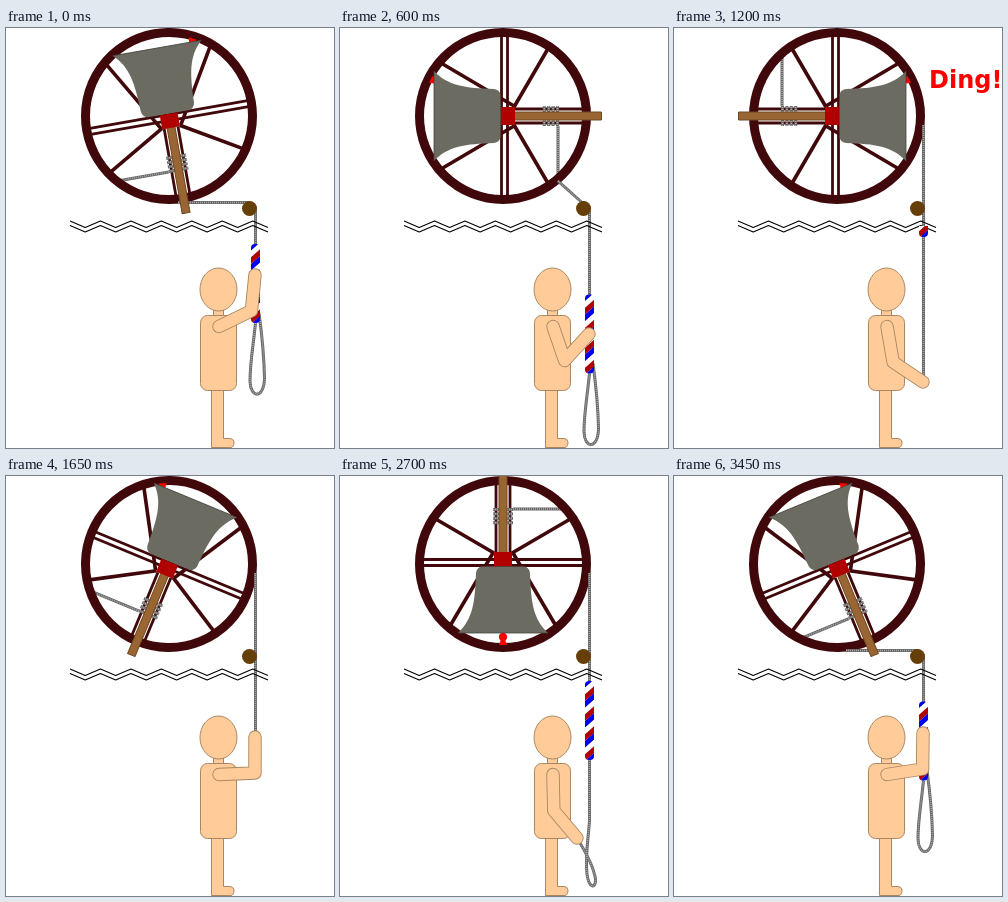
Recreate the animation shown at these times as an HTML page with a canvas. Size 328 px wide and 420 px high, loop 3.6 s.

```html
<!DOCTYPE html>
<html lang="en">
<head>
<meta charset="utf-8">
<title>Bell ringing</title>
<style>
html, body { margin: 0; overflow: hidden; background: #fff; }
canvas { display: block; }
</style>
</head>
<body>
<canvas id="stage" width="328" height="420"></canvas>
<script>
const ctx = document.getElementById('stage').getContext('2d');
const RAD = Math.PI / 180, STEP = 150, STEPS = 24;
const HUB = { x: 163, y: 88 }, SHOULDER = { x: 213, y: 298.5 };
const ROPE_X = 249.5, SALLY_LENGTH = 79;
const DARK = '#40080a', SKIN = '#ffcc99', SKIN_EDGE = '#a98762', BELL = '#6b6b62';

// One stroke of the bell; the return stroke runs it backwards.
const rotations = [170, 157.5, 135, 112.5, 90, 45, 0, -45, -90, -112.5, -135, -157.5, -170];
const sallyTops = [216, 225.5, 245, 262, 266.5, 238, 205, 169, 130, 60, 0, 0, 0];
const hands = [[249, 247], [249, 257], [249, 277], [249, 297], [249, 306], [245, 338], [237, 362],
  [243, 361], [249, 354], [249, 319], [249, 283], [249, 261], [249, 250]];
const tailBottoms = { 5: 416, 6: 411, 7: 380 };

function stroke(path, color, width) {
  ctx.strokeStyle = color;
  ctx.lineWidth = width;
  ctx.stroke(path);
}

function line(points, color, width) {
  stroke(new Path2D('M' + points.join('L')), color, width);
}

function shape(d, fill, edge) {
  const path = new Path2D(d);
  ctx.fillStyle = fill;
  ctx.fill(path);
  if (edge) stroke(path, edge, 1);
}

function rope(d) {
  const path = new Path2D(d);
  stroke(path, '#666', 3);
  ctx.setLineDash([1, 1]);
  stroke(path, '#aaa', 1.6);
  ctx.setLineDash([]);
}

function disc(x, y, r, color) {
  ctx.beginPath();
  ctx.arc(x, y, r, 0, 7);
  ctx.fillStyle = color;
  ctx.fill();
}

function inBellFrame(rotation, draw) {
  ctx.save();
  ctx.translate(HUB.x, HUB.y);
  ctx.rotate(rotation * RAD);
  draw();
  ctx.restore();
}

function drawWheel() {
  for (const y of [-4.5, 1.5]) line([[-80, y], [80, y]], DARK, 2.8);
  for (const side of [-1, 1]) {
    line([[side * 7, -80], [side * 7, -12]], DARK, 2.8);
    line([[side * 9, -11], [side * 69, -46]], DARK, 3.6);
    line([[side * 10, -11], [side * 53, 62]], DARK, 3.6);
  }
  for (let i = 0; i < 4; i++) rope(`M-10,${-54.5 + i * 4.4}h20`);
  rope('M10,-55H65');
  ctx.beginPath();
  ctx.arc(0, 0, 83.5, 0, 7);
  ctx.strokeStyle = DARK;
  ctx.lineWidth = 9;
  ctx.stroke();
}

function drawBell(rotation) {
  ctx.save();
  ctx.rotate(Math.max(-27, Math.min(27, rotation * 0.3)) * RAD);
  disc(0, 73, 4.2, '#f00');
  shape('M-1.5,74L-4,81H4L1.5,74Z', '#f00');
  ctx.restore();
  shape('M-21,2.5H21Q26,3 27,9C28,38 30,55 45,69H-45C-30,55 -28,38 -27,9Q-26,3 -21,2.5Z', BELL);
  line([[-45, 69], [45, 69]], '#44443e', 0.8);
  shape('M-4,-98.5H4V-11H-4Z', '#996633', '#70481f');
  shape('M-9,-12H9V2H-9Z', '#b00000');
}

// The rope winds on the rim, leaving it at the side, directly, or at the bottom.
function drawRopeToSally(rotation, end) {
  const angle = rotation - 40.2;
  if (angle <= 0) return rope(`M${ROPE_X},97V${end}`);
  const x = angle < 90 ? HUB.x + 85 * Math.cos(angle * RAD) : 172;
  const y = angle < 90 ? HUB.y + 85 * Math.sin(angle * RAD) : 174.5;
  rope(`M${x},${y}L242,174.5Q${ROPE_X},175 ${ROPE_X},182V${end}`);
}

function drawSally(top) {
  ctx.save();
  ctx.beginPath();
  ctx.rect(240, 198, 20, 222);
  ctx.clip();
  ctx.beginPath();
  ctx.roundRect(245, top, 9, SALLY_LENGTH, 4);
  ctx.clip();
  const band = 20 / 3;
  for (let i = 0; i < 14; i++) {
    const y = top + i * band;
    shape(`M245,${y}l9,-8v${band}l-9,8Z`, ['#0000f0', '#fff', '#b00000'][i % 3]);
  }
  ctx.restore();
}

function drawTail(pose, s, [hx, hy]) {
  if (pose <= 4) {
    rope(`M${ROPE_X},${s}C247,${s + 25} 244,${s + 40} 244,${s + 58}` +
      `C244,${s + 75} 258,${s + 77} 258.5,${s + 55}C258,${s + 30} 256,${s + 12} 253,${s - 10}`);
  } else if (pose <= 7) {
    const b = tailBottoms[pose];
    rope(`M${ROPE_X},${s}V${hy - 17}C248,${hy + 3} 245,${b - 30} 247,${b - 13}` +
      `C249,${b + 2} 256,${b + 2} 255.5,${b - 8}C254,${b - 18} 247,${hy + 16} ${hx},${hy}`);
  }
}

function drawCeiling() {
  for (const y of [193, 197.5]) {
    const points = Array.from({ length: 14 }, (_, i) => [64 + i * 15.23, y + (i % 2) * 6.5]);
    line(points, '#000', 1.1);
  }
}

function drawBody() {
  shape('M205.5,355V419.5H225Q228,419 228,414Q227.500,410.500 224,410.500H217.500V355Z', SKIN, SKIN_EDGE);
  shape('M207.500,278H217.500V290H207.500Z', SKIN, SKIN_EDGE);
  shape('M194,261.500a18.500,21.500 0 1 0 37,0a18.500,21.500 0 1 0 -37,0Z', SKIN, SKIN_EDGE);
  const torso = new Path2D();
  torso.roundRect(194.5, 287.5, 36, 75, 7);
  ctx.fillStyle = SKIN;
  ctx.fill(torso);
  stroke(torso, SKIN_EDGE, 1);
}

function drawArm([hx, hy]) {
  const dx = hx - SHOULDER.x, dy = hy - SHOULDER.y, reach = Math.hypot(dx, dy);
  const bend = Math.sqrt(36 * 36 - reach * reach / 4) / reach;
  const elbow = [SHOULDER.x + dx / 2 - dy * bend, SHOULDER.y + dy / 2 + dx * bend];
  const points = [[SHOULDER.x, SHOULDER.y], elbow, [hx, hy]];
  line(points, SKIN_EDGE, 13.4);
  line(points, SKIN, 11.6);
}

function draw(now) {
  const step = Math.floor(now / STEP) % STEPS;
  const pose = step > 12 ? STEPS - step : step;
  const rotation = rotations[pose], top = sallyTops[pose], hand = hands[pose];

  ctx.clearRect(0, 0, 328, 420);
  inBellFrame(rotation, drawWheel);
  drawRopeToSally(rotation, pose < 8 ? top + 3 : hand[1]);
  inBellFrame(rotation, () => drawBell(rotation));
  disc(243.5, 180.5, 7.5, '#663e08');
  drawCeiling();
  drawBody();
  drawTail(pose, top + SALLY_LENGTH, hand);
  drawSally(top);
  drawArm(hand);

  ctx.fillStyle = '#f00';
  ctx.font = 'bold 24px "DejaVu Sans", sans-serif';
  if (step >= 8 && step <= 10) ctx.fillText('Ding!', 255, 60);
  if (step >= 20 && step <= 22) ctx.fillText('Ding!', -1, 60);
}

ctx.lineJoin = 'round';
const start = performance.now();
function tick() {
  draw(performance.now() - start);
  requestAnimationFrame(tick);
}
// Round caps only matter for the arm; all other ends are hidden or short.
ctx.lineCap = 'butt';
const drawButtArm = drawArm;
drawArm = hand => {
  ctx.lineCap = 'round';
  drawButtArm(hand);
  ctx.lineCap = 'butt';
};
tick();
</script>
</body>
</html>
```
